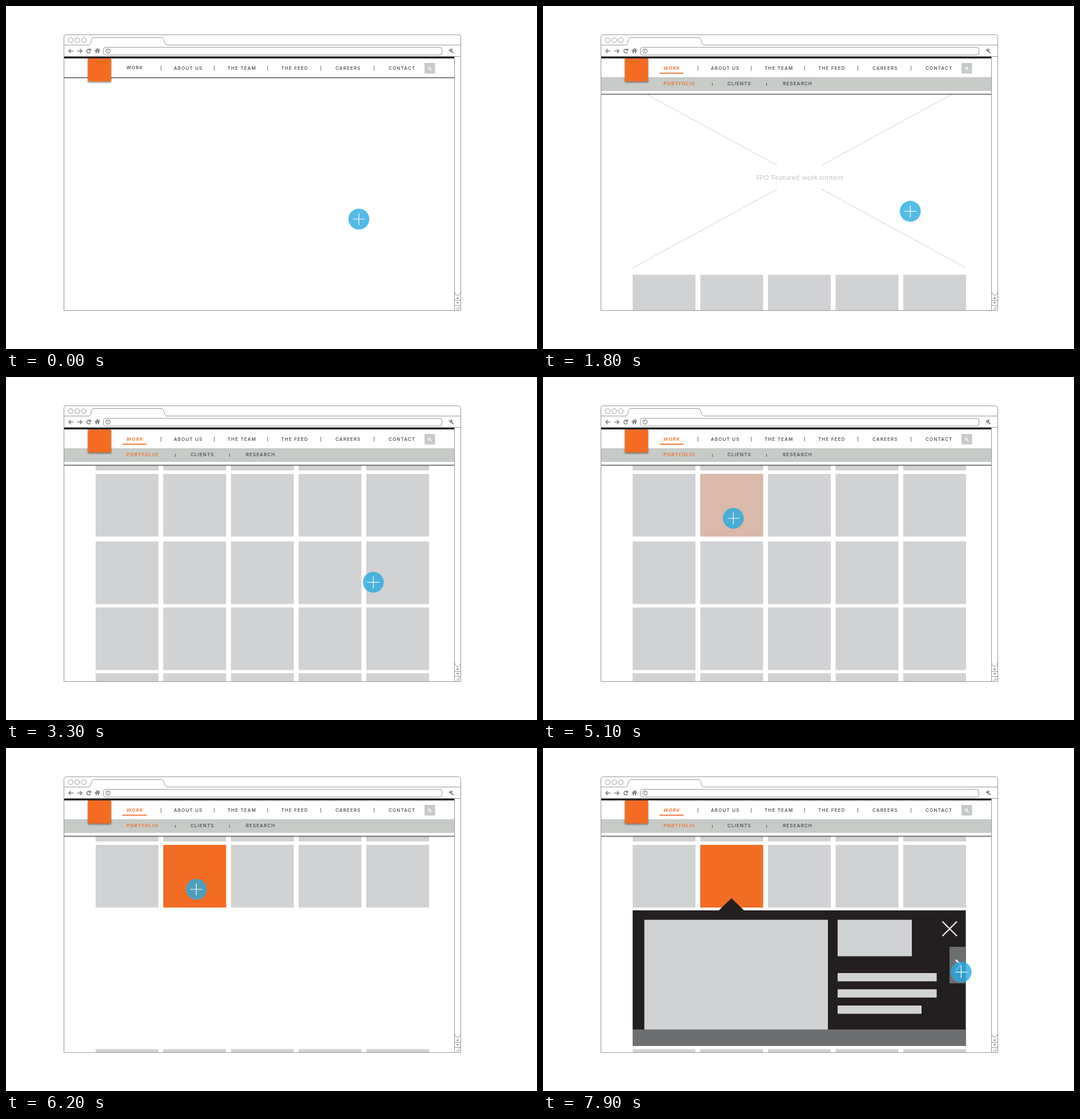
An HTML page for the animation above (8 s loop, 930 by 602 pixels).

```html
<!DOCTYPE html>
<html lang="en">
<head>
<meta charset="utf-8">
<title>Portfolio wireframe</title>
<style>
  html, body { margin: 0; width: 100%; height: 100%; overflow: hidden; background: #fff; }
  svg { display: block; }
  .nav { font: 500 8px Inter, "Open Sans", sans-serif; letter-spacing: 1.15px; fill: #414042; }
  .nav .active { font-style: italic; font-weight: 600; fill: #f36c24; }
  .fpo { font: 11.65px "Open Sans", "Noto Sans", sans-serif; fill: #bcbec0; text-anchor: middle; }
  .outline { fill: none; stroke: #939598; }
  .icon { fill: none; stroke: #808285; stroke-width: 1.6; }
  .tile { fill: #d1d2d4; }
</style>
</head>
<body>
<svg width="930" height="602" viewBox="0 0 930 602">
  <defs>
    <clipPath id="page"><rect x="101" y="89" width="684" height="445"/></clipPath>
    <filter id="shadow" x="-20%" y="-20%" width="140%" height="150%">
      <feDropShadow dx="0" dy="1.5" stdDeviation="1.5" flood-opacity=".6"/>
    </filter>
  </defs>

  <g clip-path="url(#page)">
    <g id="content">
      <g id="feature">
        <path d="M157 72L410 210M740.5 72L488 210M157 390L410 252M740.5 390L488 252" fill="none" stroke="#d1d2d4"/>
        <text class="fpo" x="449.5" y="235">FPO ‘Featured’ work content</text>
      </g>
      <g id="grid"></g>
    </g>

    <g id="panel">
      <path d="M157 285H308L330 263.5L352 285H740.5V523H157Z" fill="#231f20"/>
      <path d="M157 494H740.5V523H157ZM712 349H740.5V413H712Z" fill="#6d6e70"/>
      <path class="tile" d="M177.5 301.5H499V494H177.5ZM516 301.5H646V365.5H516ZM516 395H689.5V409.5H516ZM516 423.5H689.5V438H516ZM516 452H663V466.5H516Z"/>
      <path d="M699.5 304.5L725 330M725 304.5L699.5 330" stroke="#fff" stroke-width="2"/>
      <path d="M723 372L732 381L723 390" fill="none" stroke="#fff" stroke-width="3"/>
    </g>

    <g id="subnav" class="nav">
      <rect x="101" y="92" width="684" height="62" fill="#fff"/>
      <rect x="101" y="125" width="684" height="24" fill="#c6cbc7"/>
      <rect x="101" y="154" width="684" height="1.3" fill="#58595b"/>
      <rect x="101" y="155.3" width="684" height="1" fill="#000" opacity=".2"/>
      <path d="M296.5 135V140M391.5 135V140" stroke="#58595b"/>
      <text class="active" x="211" y="139.3">PORTFOLIO</text>
      <text x="323" y="139.3">CLIENTS</text>
      <text x="420" y="139.3">RESEARCH</text>
    </g>

    <rect x="101" y="92" width="684" height="33" fill="#fff"/>
    <rect x="101" y="89" width="684" height="3" fill="#231f20"/>
    <g id="menu" class="nav">
      <text id="workIdle" x="211" y="111">WORK</text>
      <g id="workActive">
        <text class="active" x="211" y="112">WORK</text>
        <rect x="204" y="117" width="42" height="1.7" fill="#f36c24"/>
      </g>
    </g>
    <rect x="733" y="100" width="18.5" height="18.5" fill="#c6cbc7"/>
    <g fill="none" stroke="#fff" stroke-width="1.2"><circle cx="741.5" cy="108.8" r="2"/><path d="M743 110.4L745.5 113"/></g>
    <rect x="143.5" y="92" width="40.5" height="40.3" fill="#f36c24" filter="url(#shadow)"/>
  </g>

  <g class="outline">
    <path d="M101.5 534.5V54.5Q101.5 50.5 105.5 50.5H792.5Q796.5 50.5 796.5 54.5V534.5Z"/>
    <circle cx="113.3" cy="60" r="4.2"/><circle cx="124.8" cy="60" r="4.2"/><circle cx="136.3" cy="60" r="4.2"/>
    <path d="M101 68.5H145C150 68.5 148 55.5 153 55.5H273C278 55.5 276 68.5 282 68.5H797"/>
    <rect x="170.5" y="72.5" width="593" height="13.5" rx="4"/>
    <path d="M101 88.5H797M785.5 88V534M786 502Q786 507.5 791 507.5Q796 507.5 796 502M786 516.5H796M786 525.5H796"/>
    <path d="M788 533L795 527M791 533L795 530"/>
  </g>
  <path d="M789 514L791 510.500L793 514ZM789 519.500L791 523L793 519.500Z" fill="#808285"/>
  <g class="icon">
    <path d="M118 79H110.500M113.500 75.500L110 79L113.500 82.500M125 79H132.500M129.500 75.500L133 79L129.500 82.500"/>
    <path d="M147.500 77A3.300 3.300 0 1 0 148 80.500M148.300 74.800V78H145"/>
    <path d="M155.500 79.500L160 75L164.500 79.500M163 75V77"/>
    <path d="M157 79.500L160 76.500L163 79.500V83H161V80.500H159V83H157Z" fill="#808285" stroke="none"/>
    <path d="M779 78.500L783.500 82.500M776 76.500L778.500 79L781 76.500L778.500 75" stroke-width="2"/>
    <g stroke-width="1"><circle cx="178.700" cy="79" r="4"/><path d="M176 76L179 77.500L177.500 80L180.500 82M180 75.500L182 78"/></g>
  </g>

  <g id="cursor">
    <circle r="18.3" fill="#27aae1" opacity=".8"/>
    <path d="M-10.500 0H10.500M0 -10.500V10.500" stroke="#fff" stroke-width="1.2"/>
  </g>
</svg>
<script>
const LOOP = 8000, STEP = 100;
const $ = id => document.getElementById(id);

function add(parent, tag, attrs, text = "") {
  const el = document.createElementNS("http://www.w3.org/2000/svg", tag);
  for (const name in attrs) el.setAttribute(name, attrs[name]);
  el.textContent = text;
  return parent.appendChild(el);
}

[["ABOUT US", 294], ["THE TEAM", 388], ["THE FEED", 482], ["CAREERS", 577], ["CONTACT", 670]]
  .forEach(([label, x], i) => {
    add($("menu"), "text", { x, y: 112 }, label);
    add($("menu"), "rect", { x: 271 + i * 93.3, y: 105, width: 1, height: 8.5, fill: "#6d6e71" });
  });

const tile = (row, column, y) =>
  add(row, "rect", { class: "tile", x: 157 + column * 118.5, y, width: 110, height: 110 });
const rows = [54, 170, 288.5, 404.5, 520].map(y => {
  const row = add($("grid"), "g", {});
  for (let column = 0; column < 5; column++) tile(row, column, y);
  return row;
});
const highlight = tile(rows[1], 1, 170);
highlight.style.fill = "#f36c24";

// Cursor moves: start time, number of steps, destination
const moves = [
  [500, 4, 211.5, 107.3],
  [1300, 6, 643.3, 360.3],
  [4300, 4, 333.3, 248],
  [7600, 4, 732.3, 393.3]
];

const shift = (el, x, y) => el.setAttribute("transform", `translate(${x} ${y})`);
const fade = (el, alpha) => el.setAttribute("opacity", alpha);

function draw(time) {
  const now = Math.floor(time / STEP) * STEP;
  // The first step is already visible at the start time.
  const progress = (start, steps) =>
    Math.min(steps, Math.max(0, (now - start) / STEP + 1)) / steps;

  let x = 618, y = 374;
  for (const [start, steps, toX, toY] of moves) {
    const p = progress(start, steps);
    x += (toX - x) * p;
    y += (toY - y) * p;
  }
  shift($("cursor"), x, y);

  shift($("subnav"), 0, -29 * (1 - progress(1300, 6)));
  const opened = progress(1400, 5);
  fade($("content"), opened);
  fade($("workActive"), opened);
  fade($("workIdle"), 1 - opened);

  const scroll = 417.6 * (1 - progress(2800, 6));
  shift($("grid"), 0, scroll);
  shift($("feature"), 0, scroll - 348);

  fade(highlight, progress(5100, 4));
  const parted = progress(5900, 4);
  fade(rows[2], 1 - parted);
  fade(rows[3], 1 - parted);
  shift(rows[4], 0, 8.5 * parted);
  fade($("panel"), progress(6300, 4));
}

function tick() {
  draw(performance.now() % LOOP);
  requestAnimationFrame(tick);
}
tick();
</script>
</body>
</html>
```
